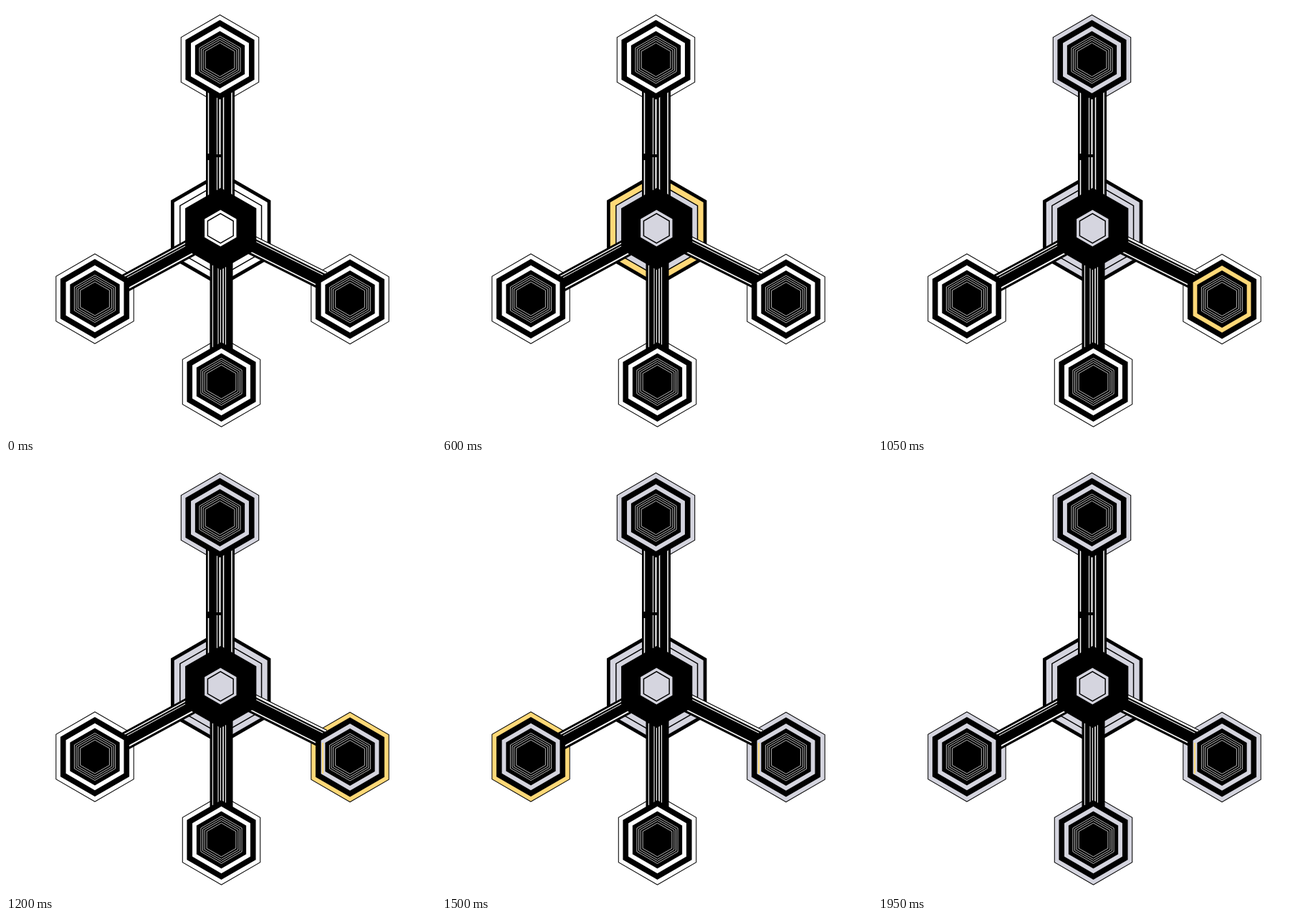
Write an HTML page with a canvas that moves like this. It is 600 px wide and 600 px high and loops after 2100 ms.

```html
<!DOCTYPE html>
<html>
<head>
<meta charset="utf-8">
<style>
html, body { margin: 0; width: 100%; height: 100%; overflow: hidden; background: #fff; }
canvas { display: block; }
</style>
</head>
<body>
<canvas id="stage" width="600" height="600"></canvas>
<script>
const ctx = document.getElementById('stage').getContext('2d');
const STEP = 150, STEPS = 14;
const YELLOW = '#ffd978', GRAY = '#d5d5df';
const nodes = [[298.5, 75], [480, 409], [124, 408.5], [300.5, 524.5]];

// start, end, half width, white stripes as [offset, width]
const arms = [
  [299, 110, 299, 275, 20, [[16.5, 1.5], [4.5, 1], [0.5, 2], [-4.5, 1.5], [-16, 1.5]]],
  [342, 333, 442, 383, 13.5, [[-11, 2.5], [-7, 1], [9.5, 1.5]]],
  [258, 337, 164, 388, 12.5, [[9, 1.5], [5.5, 1], [-8.5, 2]]],
  [300.5, 350, 300.5, 485, 16, [[12, 1], [4.5, 1], [1, 1], [-2.5, 1.5], [-6, 1]]]
];

function hexPath(x, y, r) {
  ctx.beginPath();
  for (let i = 0; i < 6; i++) {
    const a = i * Math.PI / 3;
    ctx.lineTo(x + r * Math.sin(a), y - r * Math.cos(a));
  }
  ctx.closePath();
}

function hex(x, y, r, color = '#000') {
  hexPath(x, y, r);
  ctx.fillStyle = color;
  ctx.fill();
}

function arm([x1, y1, x2, y2, half, stripes]) {
  ctx.save();
  ctx.translate(x1, y1);
  ctx.rotate(Math.atan2(y2 - y1, x2 - x1));
  const length = Math.hypot(x2 - x1, y2 - y1);
  ctx.fillStyle = '#000';
  ctx.fillRect(0, -half, length, 2 * half);
  ctx.fillStyle = '#fff';
  for (const [offset, width] of stripes) ctx.fillRect(0, offset - width / 2, length, width);
  ctx.restore();
}

function draw(step) {
  // each zone flashes yellow for one step, then stays gray
  const zone = i => step === i + 1 ? YELLOW : step > i + 1 ? GRAY : '#fff';
  ctx.fillStyle = '#fff';
  ctx.fillRect(0, 0, 600, 600);

  nodes.forEach(([x, y], i) => {
    hex(x, y, 63.2);
    hex(x, y, 62, zone(5 + 2 * i));
  });
  hex(299.7, 311.5, 80.5);
  hex(299.7, 311.5, 75, zone(3));
  hex(299.7, 311.5, 66.5);
  hex(299.7, 311.5, 64.8, zone(2));
  arms.forEach(arm);

  // breaks in the upper arm's stripes
  ctx.fillStyle = '#000';
  ctx.fillRect(281, 206, 4, 9);
  ctx.fillRect(293, 207, 7, 4);

  hex(299.7, 311, 57.3);
  hex(299.3, 310, 25.6, zone(1));
  hex(299.3, 310.3, 21.5);
  hex(299.3, 310.3, 19.8, zone(0));

  nodes.forEach(([x, y], i) => {
    hex(x, y, 55.5);
    hex(x, y, 46.7, zone(4 + 2 * i));
    if (i === 1 && step >= 7) {
      ctx.fillStyle = YELLOW;
      ctx.fillRect(441, 389, 2, 43);
    }
    hex(x, y, 40);
    ctx.strokeStyle = '#fff';
    ctx.lineWidth = 0.7;
    for (const r of [33, 30, 27, 23.5]) {
      hexPath(x, y, r);
      ctx.stroke();
    }
  });
}

function frame() {
  draw(Math.floor(performance.now() / STEP) % STEPS);
  requestAnimationFrame(frame);
}
frame();
</script>
</body>
</html>
```
